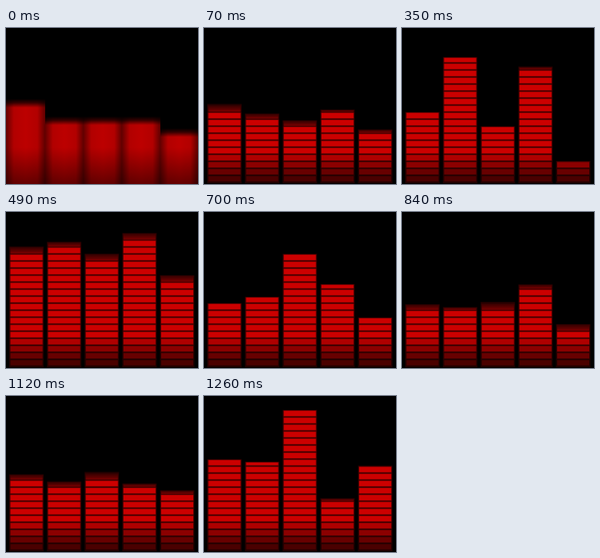
Recreate the animation shown at these times as an HTML page with a canvas. Size 240x196 px, loop 1330 ms.

```html
<!DOCTYPE html>
<html lang="en">
<head>
<meta charset="utf-8">
<title>Equalizer</title>
<style>
html, body { margin: 0; width: 100%; height: 100%; overflow: hidden; background: #000; }
canvas { display: block; width: 240px; height: 196px; }
</style>
</head>
<body>
<canvas id="stage" width="240" height="196"></canvas>
<script>
const ctx = document.getElementById('stage').getContext('2d');
const STEP = 70, STEPS = 19;
const FIRST = 17.9, PITCH = 8.82, SEGMENT = 8, BOTTOM = 195;
const BAR_W = 42, BAR_PITCH = 47.1;

// step, top edge of each bar, which bars have a fading cap
const KEYS = [
  [0, [95, 117, 117, 117, 132], '11111'],
  [3, [98, 90, 116, 75, 120], '11111'],
  [5, [106, 37, 124, 49, 167.6], '00010'],
  [6, [75, 30, 88, 18, 124], '11101'],
  [7, [44, 38, 53, 27, 80], '11111'],
  [10, [115, 107, 53, 91, 133], '00000'],
  [14, [118, 133, 174, 92, 150], '10110'],
  [18, [80, 83, 18, 129, 88], '00010']
];

function poseAt(step) {
  const i = KEYS.findIndex(key => key[0] >= step);
  const [end, tops, caps] = KEYS[i];
  if (end === step) return { tops, caps };
  const [start, from] = KEYS[i - 1];
  const p = (step - start) / (end - start);
  return { tops: from.map((y, n) => y + (tops[n] - y) * p), caps: '11111' };
}

const red = v => `rgb(${Math.round(v)},0,0)`;

function verticalFill(y0, y1, stops) {
  const g = ctx.createLinearGradient(0, y0, 0, y1);
  stops.forEach(([at, v]) => g.addColorStop(at, red(v)));
  return g;
}

function drawSegment(x, y0, y1, shade, dim) {
  const h = y1 - y0;
  const edge = Math.min(0.4, 1.3 / h);
  ctx.fillStyle = red(shade * (dim ? 0.25 : 0.4));
  ctx.fillRect(x, y0, BAR_W, h);
  ctx.fillStyle = dim
    ? verticalFill(y0, y1, [[0, shade * 0.25], [1, shade * 0.6]])
    : verticalFill(y0, y1, [[0, shade * 0.5], [edge, shade], [1 - edge, shade], [1, shade * 0.45]]);
  ctx.fillRect(x + 1, y0, BAR_W - 2, h);
}

function drawBar(x, top, fading) {
  ctx.fillStyle = red(36);
  ctx.fillRect(x - 0.5, top - 0.6, BAR_W + 1, BOTTOM - top + 0.6);
  let isCap = true;
  for (let y = FIRST; y < BOTTOM - 2; y += PITCH) {
    const y0 = Math.max(y, top), y1 = y + SEGMENT;
    if (y1 - y0 < 1.2) continue;
    const shade = 204 - 130 * Math.min(1, Math.max(0, (y - 152) / 32));
    drawSegment(x, y0, y1, shade, isCap && fading);
    isCap = false;
  }
}

// The loop opens on soft, unsegmented columns.
function drawSoftBars(tops) {
  const edges = [0, 49, 97, 145, 193, 240];
  tops.forEach((top, i) => {
    const x = edges[i], w = edges[i + 1] - x;
    const g = ctx.createLinearGradient(x, 0, x + w, 0);
    [[0, 100], [0.2, 178], [0.5, 188], [0.8, 178], [1, 95]]
      .forEach(([at, v]) => g.addColorStop(at, red(v)));
    ctx.fillStyle = g;
    ctx.fillRect(x, top - 6, w, 202 - top);
    const shade = ctx.createLinearGradient(0, top - 6, 0, top + 5);
    shade.addColorStop(0, 'rgba(0,0,0,1)');
    shade.addColorStop(0.45, 'rgba(0,0,0,0.7)');
    shade.addColorStop(1, 'rgba(0,0,0,0)');
    ctx.fillStyle = shade;
    ctx.fillRect(x, top - 7, w, 12);
  });
  const fade = ctx.createLinearGradient(0, 150, 0, 196);
  fade.addColorStop(0, 'rgba(0,0,0,0)');
  fade.addColorStop(1, 'rgba(0,0,0,0.46)');
  ctx.fillStyle = fade;
  ctx.fillRect(0, 150, 240, 46);
}

function draw() {
  const step = Math.floor(performance.now() / STEP) % STEPS;
  const { tops, caps } = poseAt(step);
  ctx.fillStyle = '#000';
  ctx.fillRect(0, 0, 240, 196);
  if (step === 0) drawSoftBars(tops);
  else tops.forEach((top, i) => drawBar(4.6 + i * BAR_PITCH, top, caps[i] === '1'));
  requestAnimationFrame(draw);
}
draw();
</script>
</body>
</html>
```
